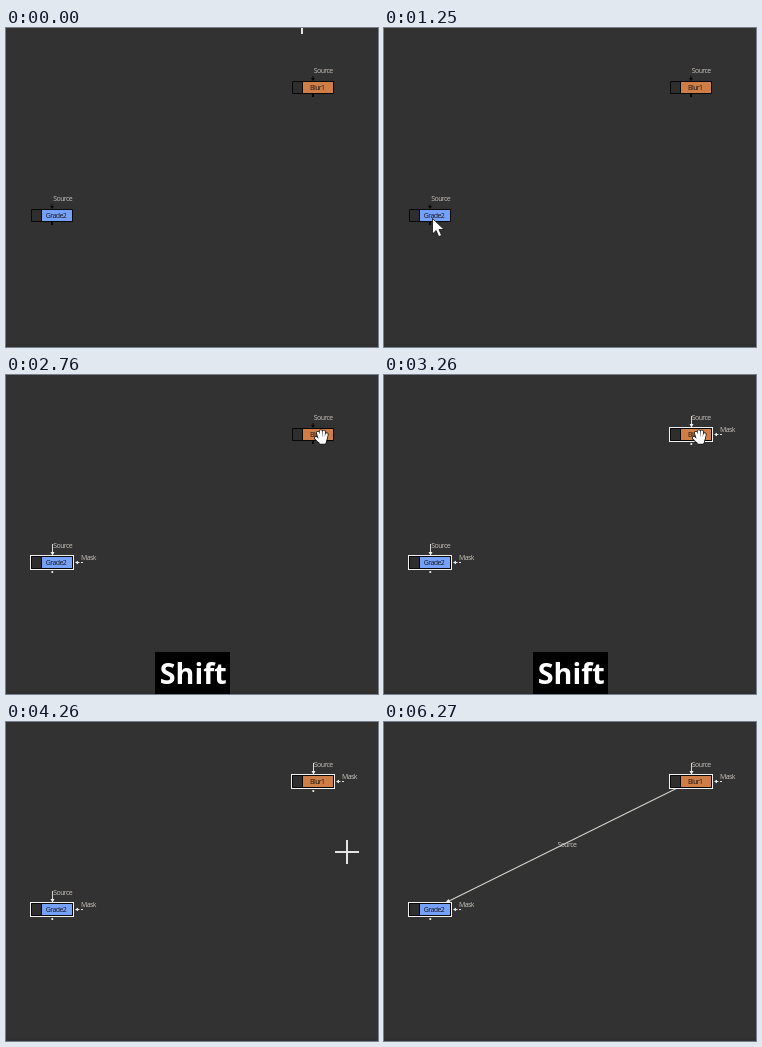
Animation of 372x319 px, one loop 6.51 s. Source, as an HTML page:

```html
<!DOCTYPE html>
<html lang="en">
<head>
<meta charset="utf-8">
<title>Connecting two nodes</title>
<style>
  html, body { margin: 0; width: 100%; height: 100%; overflow: hidden; background: #323232; }
  svg { display: block; width: 372px; height: 319px; }
  text { font: 7px "Open Sans", sans-serif; letter-spacing: -.6px; fill: #c6c0ba; }
  .name { fill: #161616; text-anchor: middle; }
  .key text { font-weight: 700; font-size: 28.7px; letter-spacing: 0; fill: #fff; text-anchor: middle; }
  .grade { color: #75a1fb; }
  .blur { color: #d07e48; }

  .anim { animation: 6510ms step-end infinite; }
  .grade-on { animation-name: grade-on; }
  .grade-off { animation-name: grade-off; }
  .blur-on { animation-name: blur-on; }
  .blur-off { animation-name: blur-off; }
  .linked { animation-name: linked; }
  .unlinked { animation-name: unlinked; }
  .shift { animation-name: shift; }
  .y { animation-name: y; }
  .cross { animation-name: cross; }
  .arrow { animation-name: arrow; }
  .hand { animation-name: hand; }

  @keyframes grade-on { 0% { opacity: 0 } 23.04%, 100% { opacity: 1 } }
  @keyframes grade-off { 0% { opacity: 1 } 23.04%, 100% { opacity: 0 } }
  @keyframes blur-on { 0% { opacity: 0 } 50.07%, 100% { opacity: 1 } }
  @keyframes blur-off { 0% { opacity: 1 } 50.07%, 100% { opacity: 0 } }
  @keyframes linked { 0% { opacity: 0 } 80.79%, 100% { opacity: 1 } }
  @keyframes unlinked { 0% { opacity: 1 } 80.79%, 100% { opacity: 0 } }
  @keyframes shift { 0%, 61.59%, 100% { opacity: 0 } 30.72% { opacity: 1 } }
  @keyframes y { 0%, 96.31%, 100% { opacity: 0 } 80.79% { opacity: 1 } }

  @keyframes cross {
    0% { opacity: 1; transform: translate(296px, -6px) }
    3.84% { opacity: 1; transform: translate(222px, 52px) }
    7.68% { opacity: 1; transform: translate(136px, 118px) }
    11.67% { opacity: 1; transform: translate(78px, 162px) }
    15.36% { opacity: 0; transform: translate(78px, 162px) }
    26.88% { opacity: 1; transform: translate(150px, 142px) }
    30.72% { opacity: 1; transform: translate(274px, 84px) }
    34.56% { opacity: 0; transform: translate(274px, 84px) }
    53.91% { opacity: 1; transform: translate(308px, 81px) }
    57.75% { opacity: 1; transform: translate(302px, 96px) }
    61.59% { opacity: 1; transform: translate(322px, 114px) }
    65.43% { opacity: 1; transform: translate(341px, 130px) }
    80.79% { opacity: 1; transform: translate(333px, 132px) }
    84.79% { opacity: 1; transform: translate(339px, 125px) }
    96.31%, 100% { opacity: 0; transform: translate(339px, 125px) }
  }
  @keyframes arrow {
    0%, 26.88%, 100% { opacity: 0; transform: translate(48px, 189px) }
    15.36% { opacity: 1; transform: translate(48px, 190px) }
    23.04% { opacity: 1; transform: translate(48px, 189px) }
  }
  @keyframes hand {
    0%, 53.91%, 100% { opacity: 0; transform: translate(308px, 54px) }
    34.56% { opacity: 1; transform: translate(307px, 56px) }
    42.39% { opacity: 1; transform: translate(308px, 54px) }
  }
</style>
</head>
<body>
<svg viewBox="0 0 372 319">
  <defs>
    <g id="body">
      <rect width="40" height="13" fill="#2e2e2e"/>
      <rect x="10" width="30" height="13" fill="currentColor"/>
      <path d="M-.5 .5H40.5V12.5H-.5zM9.5 0V13" fill="none" stroke="#080808"/>
    </g>
    <path id="ports" d="M19.5 -5h1v2h1.5l-2 3l-2 -3h1.5zM19 13h2v3h-2z" fill="#080808"/>
    <g id="frame">
      <rect x="-1.5" y="-.5" width="43" height="14" fill="none" stroke="#f0f0f0"/>
      <path d="M43 6.5l3 -1.7v3.4z" fill="#f0f0f0"/>
      <path d="M45 6.5h2.5M49 6.5h2" stroke="#e0e0e0"/>
      <text x="49" y="4">Mask</text>
    </g>
    <g id="input">
      <path d="M20.5 -12V-3" stroke="#dcdcdc"/>
      <path d="M18.5 -4h4l-2 3.5z" fill="#f0f0f0"/>
    </g>
    <circle id="output" cx="20.3" cy="16" r="1.1" fill="#f0f0f0"/>
    <path id="palm" d="M4 4L5.6 9M6.9 2.4V8M9.9 2.8L9.5 8M12.6 5.4L11.6 10M2 9L5 12M5.5 9H11.6L10.6 13.6H6.6z"
      stroke-linecap="round" stroke-linejoin="round"/>
  </defs>

  <rect width="372" height="319" fill="#323232"/>
  <rect y="316" width="372" height="3" fill="#2f2f2f"/>

  <g class="anim linked">
    <path d="M305.5 60L63 180" stroke="#d6d2cc" stroke-width="1.1"/>
    <path d="M61.5 180.5l3 -3.4l1.6 3z" fill="#f0f0f0"/>
    <text x="173.5" y="125">Source</text>
  </g>

  <g class="grade" transform="translate(26 181)">
    <use href="#body"/>
    <use href="#ports" class="anim grade-off"/>
    <g class="anim unlinked">
      <use href="#input" class="anim grade-on"/>
      <text x="21.3" y="-8">Source</text>
    </g>
    <g class="anim grade-on"><use href="#frame"/><use href="#output"/></g>
    <text class="name" x="24" y="9">Grade2</text>
  </g>

  <g class="blur" transform="translate(287 53)">
    <use href="#body"/>
    <use href="#ports" class="anim blur-off"/>
    <text x="20.8" y="-8">Source</text>
    <g class="anim blur-on">
      <use href="#input"/><use href="#frame"/>
      <use href="#output" class="anim unlinked"/>
    </g>
    <text class="name" x="24.3" y="9">Blur1</text>
  </g>

  <g class="key anim shift">
    <rect x="149" y="277" width="75" height="42"/>
    <text x="187.3" y="309">Shift</text>
  </g>
  <g class="key anim y">
    <rect x="173" y="277" width="26" height="42"/>
    <text x="186.5" y="303">y</text>
  </g>

  <path class="anim cross" d="M-12 0H12M0 -12V12" stroke="#e4e4e4" stroke-width="2"/>
  <path class="anim arrow" d="M.5 .5V16l3.6 -3.4l2.6 6l2.9 -1.2l-2.6 -5.9h5z" fill="#fff" stroke="#111" stroke-width=".8"/>
  <g class="anim hand">
    <use href="#palm" stroke="#1a1a1a" stroke-width="4"/>
    <use href="#palm" fill="#fff" stroke="#fff" stroke-width="2.4"/>
  </g>
</svg>
</body>
</html>
```
